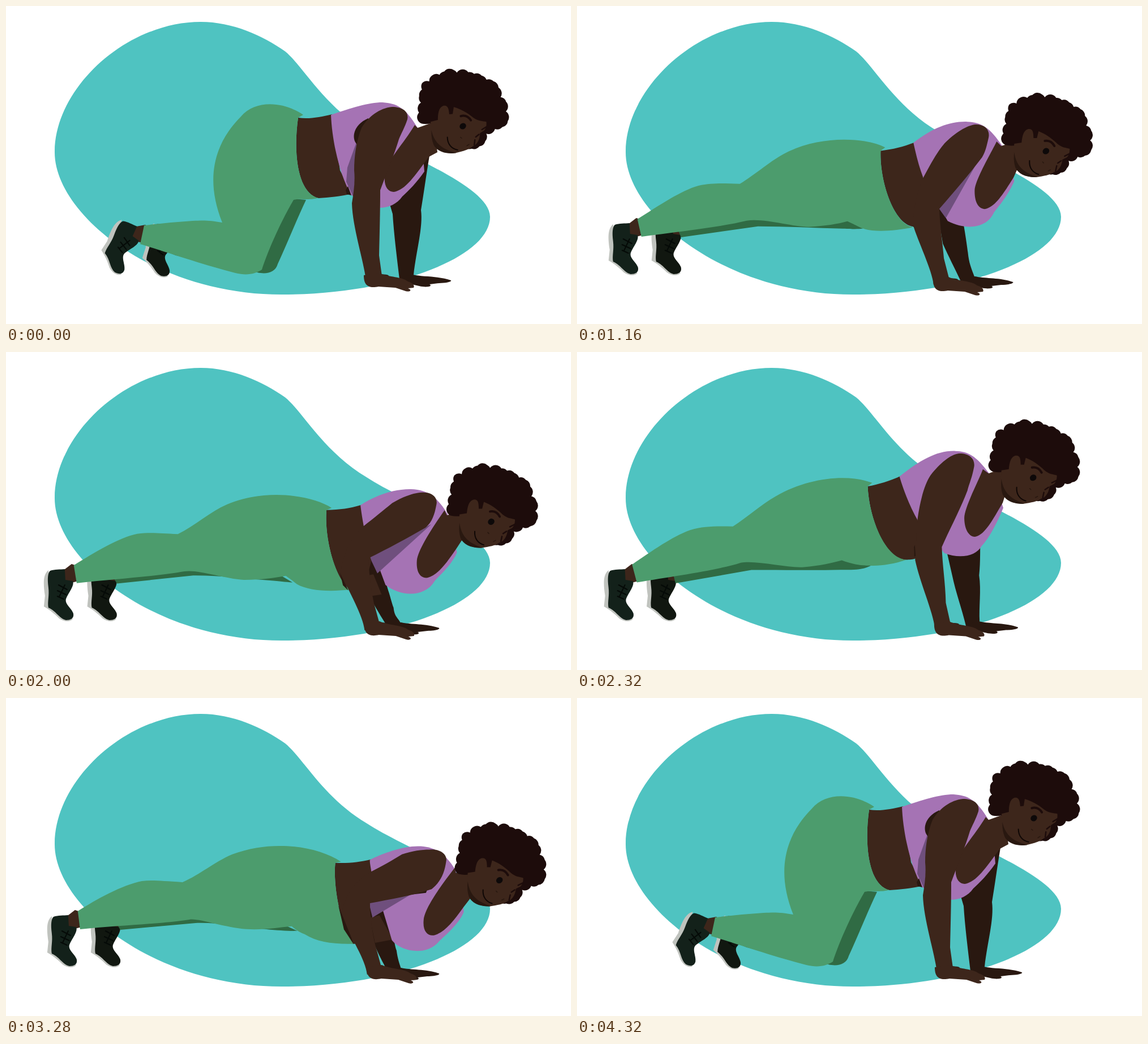
Recreate the animation shown at these times as an HTML page. Size 998 by 561 pixels, loop 4.36 s.

```html
<!DOCTYPE html>
<html lang="en">
<head>
<meta charset="utf-8">
<title>Push-up</title>
<style>
  html, body { margin: 0; width: 100%; height: 100%; overflow: hidden; background: #fff; }
  svg { display: block; width: 100%; height: 100%; }
</style>
</head>
<body>
<svg id="stage" viewBox="0 0 998 561"></svg>
<script>
const LOOP = 4360, STEP = 40;
const SKIN = '#3d261b', DARK = '#291810', HAIR = '#1d0c0b', GREEN = '#4c9c6d',
  SHADE = '#306b44', PURPLE = '#a573b4', PLUM = '#6f4f7d';

const stage = document.getElementById('stage');
const parts = [];

function add(tag, attrs, parent = stage) {
  const el = document.createElementNS('http://www.w3.org/2000/svg', tag);
  for (const key in attrs) el.setAttribute(key, attrs[key]);
  parent.appendChild(el);
  return el;
}
const fill = (d, color, parent) => add('path', { d, fill: color }, parent);
const line = (d, width, color, parent) => add('path',
  { d, fill: 'none', stroke: color, 'stroke-width': width, 'stroke-linecap': 'round' }, parent);
const numbers = d => d.match(/[\d.]+/g).map(Number);

// Weights of the poses: kneeling, arms straight, half way, low.
function weights(s, k) {
  const m = 0.44, d = 0.945;
  const straight = (s - m) * (s - d) / (m * d);
  return [k, straight - k, s * (s - d) / (m * (m - d)), s * (s - m) / (d * (d - m))];
}
const blend = (values, w) => values.reduce((sum, v, i) => sum + v * w[i], 0);

// A path that morphs between the four poses.
function morph(color, ...poses) {
  const el = fill(poses[1], color);
  const sets = poses.map(numbers);
  parts.push(w => {
    let i = 0;
    el.setAttribute('d', poses[1].replace(/[\d.]+/g, () => {
      const v = blend(sets.map(set => set[i]), w);
      i++;
      return v.toFixed(2);
    }));
  });
}

// A rigid group: [x, y] offset per pose, and a turn while kneeling.
function rigid(offsets, turn = 0, cx = 0, cy = 0) {
  const g = add('g', {});
  parts.push(w => {
    const x = blend(offsets.map(o => o[0]), w), y = blend(offsets.map(o => o[1]), w);
    g.setAttribute('transform', `translate(${x} ${y}) rotate(${turn * w[0]} ${cx} ${cy})`);
  });
  return g;
}

function shoe(offsets, turn, color) {
  const g = rigid(offsets, turn, 88, 395);
  fill('M79 384L92 374L98 376L104 404L92 407L80 403Z', SKIN, g);
  fill('M51 385C41 393 42 410 45 430L43 449C55 456 62 462 70 470C80 477 90 476 94 471L60 440Z', '#c0c3be', g);
  fill('M54 386C62 383 72 384 80 383L81 402L94 404C98 412 86 425 82 436C80 445 92 452 95 461' +
    'C97 470 90 473 82 473C70 470 66 458 51 451C49 440 53 430 51 415C49 400 50 390 54 386Z', color, g);
  line('M69 411L84 419M67 421L82 428M67 431L78 436M80 411L70 432', 2, '#050a07', g);
}

fill('M344 28C400 28 453 52 493 80C525 106 560 175 637 221C700 263 855 318 855 372' +
  'C855 445 680 509 487 509C260 509 86 366 86 258C86 144 213 28 344 28Z', '#4fc3c1');

// Far leg and arm
shoe([[208, 6], [75, 0], [89, 0], [107, 0]], 12, '#111710');
morph(SHADE,
  'M300 440L290 436L400 440L508 340L530 342C512 380 492 430 480 455C476 470 460 474 444 470Z',
  'M168 408L165 392L300 350L460 350L536 364C520 377 490 379 460 379C400 382 350 381 300 382Z',
  'M184 408L180 398L310 375L470 375L505 393C495 394 490 394 470 393C420 392 370 389 320 389Z',
  'M202 409L198 402L330 385L480 395L515 411C495 411 480 410 460 408C420 405 380 396 335 397Z');
morph(DARK,
  'M742 255L748 264C742 300 738 330 733 360C737 390 725 430 720 474L695 482C690 440 685 400 683 367L678 350Z',
  'M736 240L741 256C738 300 736 330 729 358C735 390 722 440 719 474L695 482C690 440 682 410 679 372L668 340Z',
  'M665 345L682 385C684 395 688 420 690 435C692 455 696 462 702 478L678 486C668 465 655 440 646 420L634 350Z',
  'M668 345L685 420C686 430 688 440 690 445C692 460 695 468 698 478L672 478C665 465 658 452 651 435L636 350Z');
fill('M695 478L719 474C735 478 765 476 786 484C788 487 775 489 765 489L748 491' +
  'C755 495 742 497 730 494L712 490L697 486Z', DARK, rigid([[0, 0], [0, 0], [-16, 3], [-21, 2]]));
morph(SKIN,
  'M625 400L635 400L640 430L630 430Z',
  'M620 390L630 390L640 430L630 430Z',
  'M625 400L635 400L640 430L630 430Z',
  'M643 387L660 383L684 426L652 432Z');

// Torso
morph(SKIN,
  'M516 197C535 200 555 196 576 191L590 290L612 331C590 336 570 338 552 339C515 330 507 260 516 197Z',
  'M500 226C515 222 540 215 558 205L600 290L606 342C590 350 580 352 570 353C530 345 505 270 500 226Z',
  'M537 256C560 253 575 250 598 241L612 303L640 360C620 393 605 390 594 390C560 385 535 310 537 256Z',
  'M582 291C605 292 625 290 645 285L650 320L643 362C640 430 625 435 612 434C590 400 578 330 582 291Z');
morph(PURPLE,
  'M574 192C610 180 640 170 665 170C690 172 705 178 727 215L738 280L739 292C725 312 712 325 700 336C690 350 675 357 655 356L610 334C590 300 576 240 574 192Z',
  'M555 207C590 180 620 156 655 157C675 157 690 163 714 194L738 246L741 255C732 280 715 320 700 332C690 343 665 345 648 340L600 295C580 265 565 235 555 207Z',
  'M595 242C630 215 660 204 690 205C715 206 730 215 752 248L770 300L773 310C762 335 745 355 737 365C725 392 690 398 655 380L612 303C605 285 600 265 595 242Z',
  'M643 286C665 275 700 262 728 262C755 262 775 272 795 305L808 370L809 378C800 400 775 420 765 430C745 455 700 450 682 428L646 308C645 300 643 293 643 286Z');
morph(SKIN,
  'M722 210C710 230 690 255 683 266C660 300 668 328 685 328C705 325 722 300 747 266L762 258L755 205L727 215Z',
  'M703 187C695 210 672 255 673 275C674 296 685 308 694 306C710 302 722 275 740 244L745 225L738 185L714 194Z',
  'M742 240C735 255 705 305 703 325C702 350 712 360 722 359C740 355 755 330 772 303L780 285L774 240L750 248Z',
  'M793 300C770 330 740 370 738 392C736 412 745 421 757 419C775 414 790 395 808 370L822 352L817 304L795 309Z');
morph(PLUM,
  'M622 232L603 285L601 310L614 338Z',
  'M602 225L597 265L598 290L604 310Z',
  'M712 270L630 335L639 357L652 375Z',
  'M757 322L640 348L641 362L647 387Z');
morph(DARK,
  'M640 198C612 210 610 235 620 244L640 240Z',
  'M640 198C620 210 615 235 620 244L640 240Z',
  'M700 225C690 230 685 240 690 244L705 240Z',
  'M750 325C735 336 720 344 708 349L742 345Z');

// Near leg
shoe([[145, 8], [0, 0], [13, 0], [30, 0]], 27, '#13211a');
morph(GREEN,
  'M525 192C490 168 440 165 415 195C380 230 345 290 382 382C360 378 350 378 330 379C300 381 270 384 244 387L237 420C280 433 350 457 405 471C425 476 440 473 452 465C460 440 480 390 508 342C515 340 525 341 530 341C540 341 545 340 552 339C515 330 507 260 516 197Z',
  'M508 220C460 205 400 217 340 253C312 270 290 290 268 304C235 304 212 304 190 313C155 328 125 350 92 374L101 406C170 393 245 382 284 367C310 363 360 376 395 373C420 371 445 364 463 360C490 368 505 367 530 366C550 363 560 359 574 352C530 345 505 270 500 226Z',
  'M545 250C510 232 430 228 370 259C345 271 315 298 288 314C258 313 240 312 215 317C185 325 145 352 107 376L114 407C180 398 255 390 300 379C330 374 380 390 410 390C440 388 460 385 478 380C495 388 500 391 505 393C525 400 560 398 594 391C560 385 535 310 537 256Z',
  'M592 289C550 262 472 249 400 276C365 291 345 311 312 325C275 323 260 321 240 323C205 330 160 355 127 376L131 408C200 401 280 398 324 391C340 388 385 405 425 408C455 410 480 405 505 403C513 410 520 414 528 417C550 431 580 435 614 434C590 400 578 330 582 291Z');

// Near arm
morph(SKIN,
  'M682 178C700 178 712 186 709 200C704 215 698 225 694 235C685 265 672 295 661 325C661 360 660 400 659 440L664 476L636 484C632 450 612 390 611 348C614 330 617 310 615 290C615 260 620 235 628 215C640 195 660 180 682 178Z',
  'M655 161C675 160 688 170 686 185C682 210 676 215 672 235C665 270 655 300 649 332C650 365 656 400 656 440L663 476L636 484C632 450 610 400 601 350C602 330 603 310 598 285C595 255 602 215 610 200C625 178 640 163 655 161Z',
  'M705 210C722 210 730 220 728 232C724 250 722 258 716 268C695 295 665 330 640 358C641 390 646 420 648 445L657 480L630 492C627 465 602 415 593 385C595 360 598 335 612 303C625 280 635 260 650 243C668 225 690 211 705 210Z',
  'M748 268C770 266 780 278 778 288C775 310 768 325 752 338C715 350 680 355 643 362C643 390 650 430 655 445L664 478L638 488C635 460 610 425 592 385C595 360 610 325 644 307C665 297 685 285 700 276C718 270 735 268 748 268Z');
morph(DARK,
  'M604 318L610 334L602 332L600 325Z',
  'M598 292L604 338L600 341L597 305Z',
  'M594 388L595 390L595 391L594 390Z',
  'M587 365L611 425L614 434L597 408Z');
const hand = rigid([[-2, -1], [0, 0], [-5, 6], [3, -1]]);
add('ellipse', { cx: 669, cy: 477, rx: 9, ry: 2.5, fill: DARK }, hand);
fill('M634 476L661 472C680 480 700 478 712 487C722 490 724 495 722 498L712 499' +
  'C720 502 716 506 708 504L690 498L660 496C640 500 634 492 634 476Z', SKIN, hand);

// Head
const head = rigid([[15, 11], [0, 0], [37, 56], [80, 121]], -5.2, 792, 201);
const curls = [[717, 170], [722, 153], [720, 141], [726, 130], [727, 119], [740, 117], [746, 107],
  [759, 107], [768, 102], [785, 101], [790, 106], [810, 107], [820, 111], [833, 115], [841, 123],
  [853, 127], [861, 139], [863, 156], [872, 165], [870, 182], [872, 199], [861, 209], [848, 211],
  [832, 218], [829, 231], [818, 239], [804, 242], [795, 241]];
fill('M720 190' + curls.map(([x, y]) => `A12 12 0 0 1 ${x} ${y}`).join('') +
  'L760 220L749 187Q735 194 720 190Z', HAIR, head);
fill('M736 188L749 186C750 176 752 164 761 162C769 161 770 168 770 178L776 178L779 166' +
  'C790 170 802 178 812 188C820 195 828 195 834 197C834 203 833 208 829 212L821 216' +
  'C820 226 815 236 806 238C800 243 788 245 775 247C758 247 744 241 738 230C734 215 735 200 736 188Z', SKIN, head);
fill('M736 203C739 225 750 237 772 245L776 247C757 248 743 241 738 230C735 220 735 212 736 203Z', DARK, head);
line('M790 183Q801 181 807 192', 4, HAIR, head);
line('M825 210L833 206M813 222L819 218M811 227L809 236', 2.5, HAIR, head);
add('ellipse', { cx: 792, cy: 201, rx: 6, ry: 5.3, fill: '#0d0909', transform: 'rotate(-35 792 201)' }, head);
line('M763 218C762 231 769 239 779 242', 2, '#0f0705', head);
line('M786 220L788 222M796 236L800 234', 1.5, DARK, head);

// Value of a table of [time, value] with eased spans.
function ease(table, t) {
  let i = 1;
  while (i < table.length - 1 && t > table[i][0]) i++;
  const [t0, a] = table[i - 1], [t1, b] = table[i];
  const p = Math.min(1, Math.max(0, (t - t0) / (t1 - t0)));
  return a + (b - a) * (1 - Math.cos(Math.PI * p)) / 2;
}
const depth = [[820, 0], [1560, 0.99], [1660, 1], [1790, 0.99], [2420, 0.11], [2484, 0.1],
  [3140, 1], [3201, 0.995], [3698, 0.11], [3920, 0.08], [3960, 0]];
const kneel = [[0, 1], [780, 0], [3960, 0], [4320, 1]];

function draw() {
  const t = Math.floor(performance.now() % LOOP / STEP) * STEP;
  const w = weights(ease(depth, t), ease(kneel, t));
  parts.forEach(update => update(w));
  requestAnimationFrame(draw);
}
draw();
</script>
</body>
</html>
```
